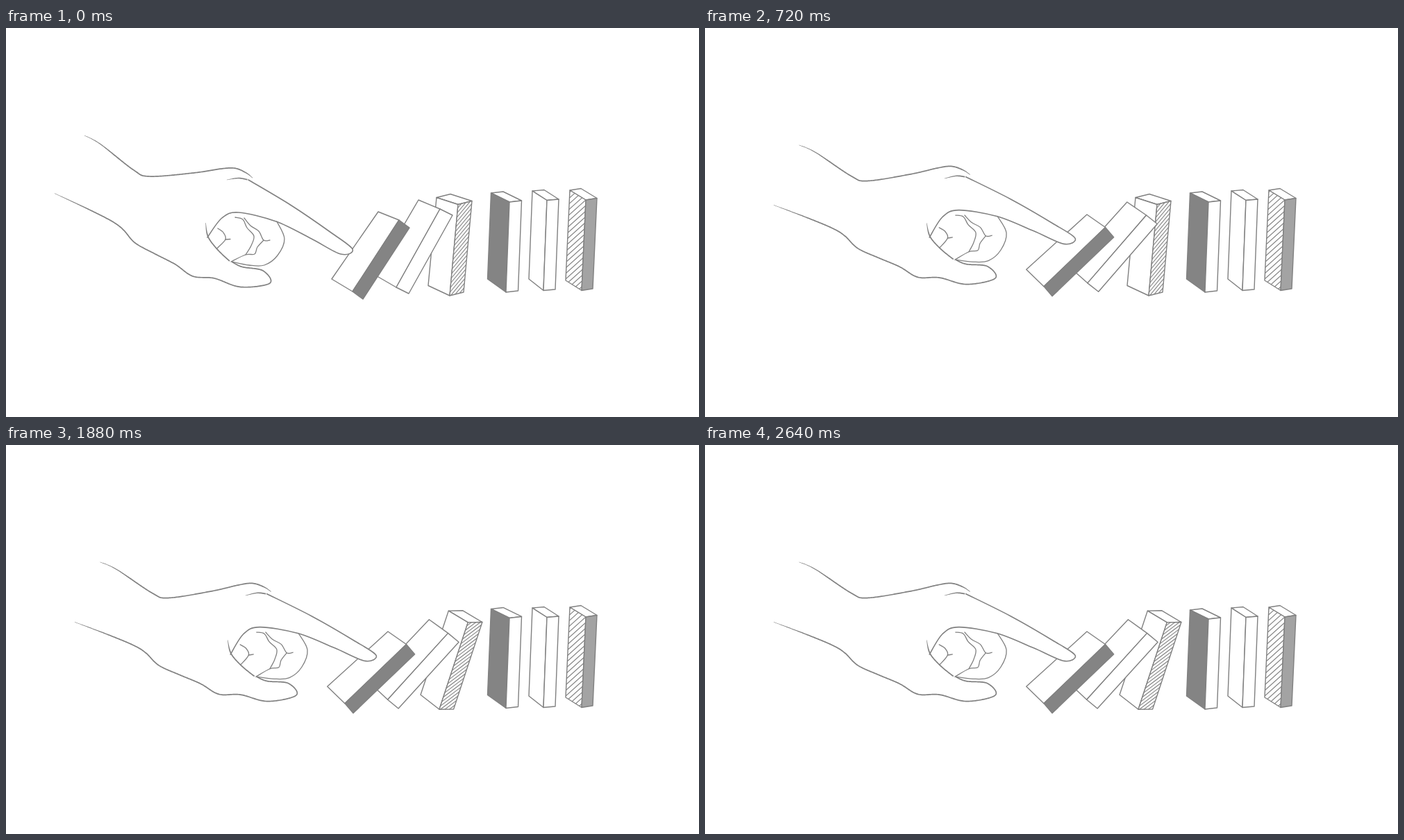
An HTML page that plays this animation: 998 px wide and 561 px high, repeating every 4 s.

```html
<!DOCTYPE html>
<html lang="en">
<head>
<meta charset="utf-8">
<title>Dominoes</title>
<style>
html, body { margin: 0; width: 100%; height: 100%; overflow: hidden; background: #fff; }
svg { display: block; width: 100%; height: 100%; }
#blocks { stroke: #808080; stroke-width: 1.4; stroke-linejoin: round; }
.hatch { fill: none; stroke-width: 1.1; }
#hand { fill: none; stroke: #808080; stroke-width: 1.6; stroke-linecap: round; stroke-linejoin: round; }
#hand .ink { fill: #808080; stroke: none; }
#hand .thin { stroke-width: 1.3; }
</style>
</head>
<body>
<svg viewBox="0 0 998 561">
  <defs></defs>
  <g id="blocks"></g>
  <g id="hand"></g>
</svg>
<script>
const NS = 'http://www.w3.org/2000/svg', LOOP = 4000, STEP = 40;
const WHITE = '#fff', DARK = '#848484', LIGHT = '#a3a3a3';
const defs = document.querySelector('defs');
const blocks = document.getElementById('blocks');
const hand = document.getElementById('hand');

function make(parent, tag, attrs) {
  const el = document.createElementNS(NS, tag);
  for (const key in attrs) el.setAttribute(key, attrs[key]);
  parent.appendChild(el);
  return el;
}

const plus = (a, b) => [a[0] + b[0], a[1] + b[1]];

// Rising parallel lines clipped to a face.
function hatch(parent, corners, slope, gap) {
  const id = 'clip' + defs.childElementCount;
  make(make(defs, 'clipPath', { id }), 'polygon', { points: corners.join(' ') });
  const xs = corners.map(p => p[0]), ys = corners.map(p => p[1]);
  const left = Math.min(...xs), right = Math.max(...xs);
  const rise = (right - left) * slope, end = Math.max(...ys) + rise;
  let d = '';
  for (let y = Math.min(...ys); y < end; y += gap) d += `M${left} ${y}L${right} ${y - rise}`;
  make(parent, 'path', { d, class: 'hatch', 'clip-path': `url(#${id})` });
}

// A box around its middle edge: foot and side are vectors from the edge's top,
// front is the front face's width and its rise at the top and at the bottom.
function block({ top, foot, side, front: [width, riseTop, riseFoot], fills = [WHITE, WHITE], lines = [] }) {
  const g = make(blocks, 'g');
  const base = plus(top, foot);
  const corner = plus(top, [-width, -riseTop]);
  const faces = [
    [corner, top, base, plus(base, [-width, -riseFoot])],
    [top, plus(top, side), plus(base, side), base]
  ];
  if (side[1] < 0) {
    const lid = [corner, plus(corner, side), plus(top, side), top];
    make(g, 'polygon', { points: lid.join(' '), fill: WHITE });
  }
  faces.forEach((face, i) => {
    make(g, 'polygon', { points: face.join(' '), fill: fills[i] });
    if (lines[i]) hatch(g, face, ...lines[i]);
  });
  return g;
}

// Smooth curve through key points.
function curve(text) {
  const p = text.split(' ').map(s => s.split(',').map(Number));
  let d = 'M' + p[0];
  for (let i = 0; i < p.length - 1; i++) {
    const a = p[i], b = p[i + 1], before = p[i - 1] || a, after = p[i + 2] || b;
    const bend = (at, from, to) => at.map((v, k) => v + (to[k] - from[k]) / 6);
    d += `C${bend(a, before, b)} ${bend(b, after, a)} ${b}`;
  }
  return d;
}

const line = (text, attrs) => make(hand, 'path', { d: curve(text), ...attrs });

// Pen stroke that swells from a fine point over the given lengths.
function ink(text, fadeIn, fadeOut) {
  const path = line(text, { class: 'ink' });
  const length = path.getTotalLength(), there = [], back = [];
  for (let s = 0; s <= length; s += 1.5) {
    const p = path.getPointAtLength(s), q = path.getPointAtLength(Math.min(length, s + 0.5));
    const o = path.getPointAtLength(Math.max(0, s - 0.5));
    const angle = Math.atan2(q.y - o.y, q.x - o.x);
    const grow = Math.min(1, s / fadeIn, fadeOut ? (length - s) / fadeOut : 1);
    const r = 0.25 + 0.6 * grow, dx = -Math.sin(angle) * r, dy = Math.cos(angle) * r;
    there.push([p.x + dx, p.y + dy]);
    back.unshift([p.x - dx, p.y - dy]);
  }
  path.setAttribute('d', `M${there.concat(back).join('L')}Z`);
}

const sixth = block({ top: [835, 248], foot: [-6, 130.5], side: [16, -2.5], front: [23, 14, 14.5],
  fills: [WHITE, LIGHT], lines: [[0.9, 8]] });
block({ top: [779, 248.5], foot: [-5, 130], side: [17, -1.5], front: [21, 13.5, 16.5] });
const fourth = block({ top: [725, 251], foot: [-5, 130], side: [17.5, -2], front: [26.5, 13, 19],
  fills: [DARK, WHITE] });
const third = block({ top: [651, 254.5], foot: [-12, 131.5], side: [20, -5], front: [31, 10, 14.5],
  lines: [null, [1.2, 6]] });
const second = block({ top: [625, 261], foot: [-63, 113], side: [18, 9], front: [31, 13, 18] });
const first = block({ top: [566, 277], foot: [-67, 103], side: [15, 11], front: [30, 12, 18],
  fills: [WHITE, DARK] });

// Finger, wrist, thumb, then the curled fingers.
line('349,219 411,256 468,295 499,319 482,326 440,304 389,279 335,266 311,274 290,302', { fill: WHITE });
ink('113,155 136,167.5 184,205 207,214 270,209 310,203 330,202.3 346,209 356,217', 50, 15);
ink('318,219 335,216.5 349,219', 20);
ink('70,238.5 120,262 153,279 169,291 186,310 215,326 244,341 269,358 300,361 338,373.5 380,368 370,350 340,344.5 325,337', 60);
ink('287.5,281 291,301 305,320 323,337', 15);
for (const fold of [
  '330,273 341,276 347,288 357,300 353,314 345,327',
  '343,274 352,285 364,293 371,306 380,306',
  '371,306 362,316 358,326 345,327 324,337',
  '305,289 313,295 316,305 303.5,318',
  '316,305 323,304.5',
  '390,279 401,304 391,328 372,342 350,342 325,337'
]) line(fold, { class: 'thin' });

function ease(t, from, to) {
  const x = Math.min(1, Math.max(0, (t - from) / (to - from)));
  return x * x * (3 - 2 * x);
}

function tilt(el, p, [x, y], [dx, dy], angle) {
  el.setAttribute('transform', `translate(${p * dx} ${p * dy}) rotate(${p * angle} ${x} ${y})`);
}

function hop(el, t, from, to, height) {
  const mid = (from + to) / 2;
  const lift = ease(t, from, mid) - ease(t, mid, to);
  el.setAttribute('transform', `translate(0 ${-height * lift})`);
}

function draw(t) {
  const push = ease(t, 0, 560);
  tilt(hand, push, [500, 320], [34, -16], -4.35);
  tilt(first, push, [515, 391], [-14, -4], 13.1);
  tilt(second, ease(t, 560, 760), [580, 383.5], [-15, -3], 13.1);
  tilt(third, ease(t, 760, 1040), [639, 386], [-15, -4.7], 13);
  hop(fourth, t, 1560, 1920, 12);
  hop(sixth, t, 2200, 2640, 10);
}

const start = performance.now();
function tick() {
  const t = (performance.now() - start) % LOOP;
  draw(Math.floor(t / STEP) * STEP);
  requestAnimationFrame(tick);
}
tick();
</script>
</body>
</html>
```
